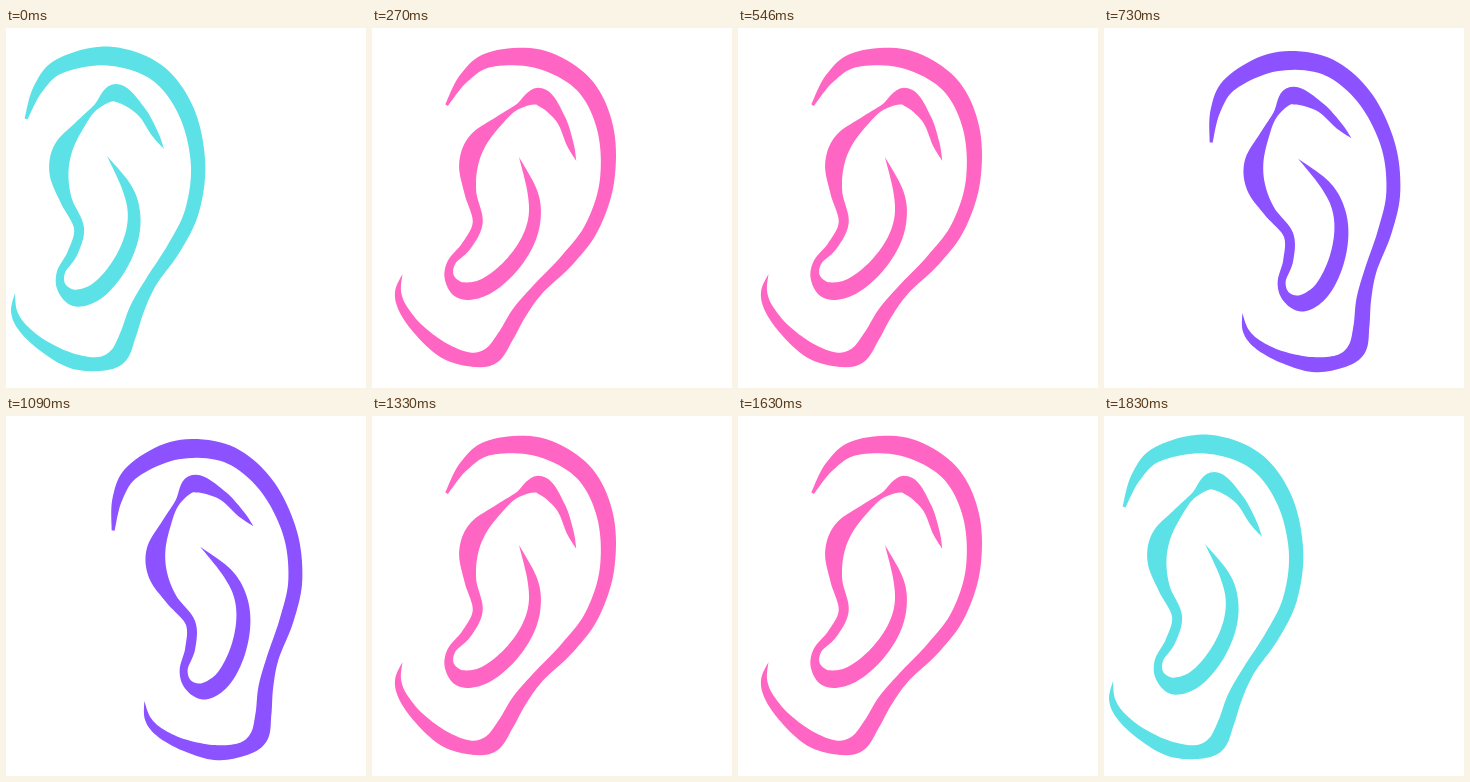
Recreate the animation shown at these times as an HTML page. Size 360 px wide and 360 px high, loop 2010 ms.

```html
<!DOCTYPE html>
<html lang="en">
<head>
<meta charset="utf-8">
<title>Ear</title>
<style>
html, body { margin: 0; width: 100%; height: 100%; overflow: hidden; background: #fff; }
svg { display: block; width: 100vw; height: 100vh; }
</style>
</head>
<body>
<svg viewBox="0 0 360 360"><path id="ear"/></svg>
<script>
const LOOP = 2010;
const STEPS = 10;
const ear = document.getElementById('ear');

// Key points of two brush strokes: x, y, half width
const rim = `20,91,1.5 32,61,5 54,38,7.5 102,28,9.5 150,44,8.9 180,83,8.2 192,135,7.2
  186,183,7 168,220,7 145,254,6 131,281,7.4 122,307,8 112,328,9 93,336,7
  65,332.5,7.5 36,317,5.7 16,299,4.5 8,283,3 9,265,0`;
const fold = `158,121,0 149,106,3.5 134,82,5 110,65,9 90,79,2.7 73,98,5 57,121,9.5
  53,145,9.5 60,172,6 73,200,5 66.5,225,5 55,244,4 56,260,5 70,270,8.5
  91,263,8.5 111,241,8 124.5,213,7.2 128,186,6.2 121,160,5 101,128,0`;

// Catmull-Rom value between b and c, and its slope
const mix = (a, b, c, d, t) =>
  b + t / 2 * (c - a + t * (2 * a - 5 * b + 4 * c - d + t * (3 * (b - c) + d - a)));
const slope = (a, b, c, d, t) =>
  (c - a) / 2 + t * (2 * a - 5 * b + 4 * c - d) + 1.5 * t * t * (3 * (b - c) + d - a);

// Outline of a stroke whose width follows its key points
function brush(text) {
  const keys = text.split(/\s+/).map(s => s.split(',').map(Number));
  const last = keys.length - 1;
  const at = i => keys[Math.max(0, Math.min(last, i))];
  const one = [], other = [];
  for (let n = 0; n <= last * STEPS; n++) {
    const i = Math.min(last - 1, Math.floor(n / STEPS));
    const t = n / STEPS - i;
    const near = [-1, 0, 1, 2].map(k => at(i + k));
    const along = (f, axis) => f(...near.map(p => p[axis]), t);
    const [x, y, w] = [0, 1, 2].map(axis => along(mix, axis));
    const dx = along(slope, 0), dy = along(slope, 1);
    const k = w / Math.hypot(dx, dy);
    const point = side => `${(x - side * dy * k).toFixed(2)},${(y + side * dx * k).toFixed(2)}`;
    one.push(point(1));
    other.unshift(point(-1));
  }
  return `M${[...one, ...other].join('L')}Z`;
}
ear.setAttribute('d', brush(rim) + brush(fold));

const pose = (color, x, y, turn, size = 1) => ({
  color,
  move: `translate(${x} ${y}) rotate(${turn}) scale(${size}) translate(-72 -151.5)`
});
const left = pose('#5ce1e6', 72, 151.5, 0);
const middle = pose('#ff66c4', 114, 146.5, 11);
const right = pose('#8c52ff', 171.8, 160.3, -14, 0.994);

function poseAt(t) {
  if (t < 270 || t >= 1830) return left;
  return t < 730 || t >= 1330 ? middle : right;
}

function draw(ms) {
  const { color, move } = poseAt(ms % LOOP);
  ear.setAttribute('fill', color);
  ear.setAttribute('transform', move);
}

let start;
function tick(now) {
  start ??= now;
  draw(now - start);
  requestAnimationFrame(tick);
}
draw(0);
requestAnimationFrame(tick);
</script>
</body>
</html>
```
